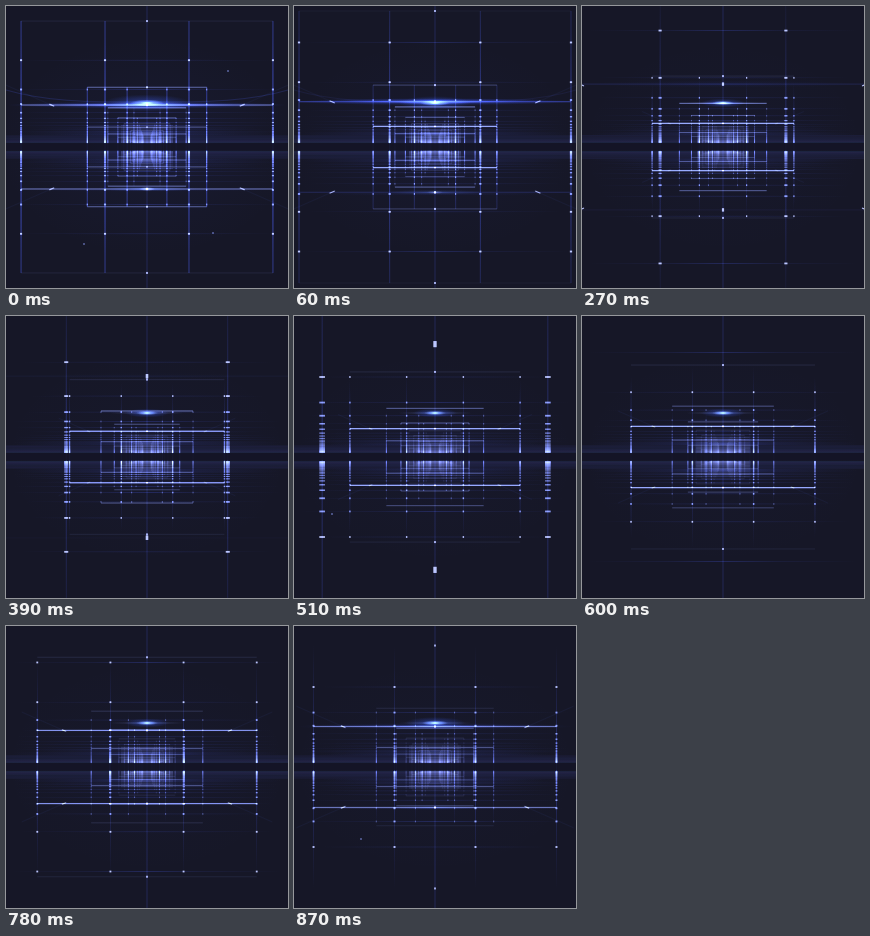
An HTML page with a canvas that plays this animation: 282x282 px, repeating every 0.9 s.

```html
<!DOCTYPE html>
<html>
<head>
<meta charset="utf-8">
<style>
html, body { margin: 0; height: 100%; overflow: hidden; background: #161727; }
canvas { display: block; }
</style>
</head>
<body>
<canvas id="stage" width="282" height="282"></canvas>
<script>
const ctx = document.getElementById('stage').getContext('2d');
const LOOP = 900, STEP = 30, HALF = 141;
const FRAME_GAP = .0088, ROW_GAP = FRAME_GAP * 2 / 3, ROW_LOOP = LOOP / 5;
const BLUE = '58,78,225', PALE = '140,158,250', WHITE = '200,210,255';
const SIGNS = [-1, 1];
// Sparks: time, x, y from the centre
const SPARKS = [[0, 81, -76], [0, -63, 97], [0, 66, 86], [150, -87, -84],
  [510, -103, 57], [690, 24, -45], [690, 32, 51], [870, -74, 72]];

function box(x, y, w, h, color, alpha) {
  if (alpha < .01) return;
  ctx.fillStyle = `rgba(${color},${Math.min(alpha, 1)})`;
  ctx.fillRect(x - w / 2, y - h / 2, w, h);
}

function glow(x, y, rx, ry, color, alpha) {
  if (alpha < .01) return;
  const g = ctx.createRadialGradient(0, 0, 0, 0, 0, 1);
  g.addColorStop(0, `rgba(${color},${alpha})`);
  g.addColorStop(.4, `rgba(${color},${alpha * .35})`);
  g.addColorStop(1, `rgba(${color},0)`);
  ctx.save();
  ctx.translate(x, y);
  ctx.scale(rx, ry);
  ctx.fillStyle = g;
  ctx.fillRect(-1, -1, 2, 2);
  ctx.restore();
}

function segment(x1, y1, x2, y2, width, color, alpha) {
  ctx.strokeStyle = `rgba(${color},${alpha})`;
  ctx.lineWidth = width;
  ctx.beginPath();
  ctx.moveTo(x1, y1);
  ctx.lineTo(x2, y2);
  ctx.stroke();
}

// Perspective: a plane's size is the inverse of its distance
function frameSizes(t) {
  const sizes = [];
  for (let k = 0; k < 10; k++) {
    const depth = .00794 + FRAME_GAP * (k - t / LOOP);
    if (depth > .0018) sizes.push({ k, h: 1 / depth });
  }
  return sizes;
}

function rowHeights(t) {
  const rows = [];
  for (let m = -2; m < 40; m++) {
    const depth = .0125 + ROW_GAP * (m - ((t - 150) % ROW_LOOP) / ROW_LOOP);
    if (depth > .0068 && depth < .235) rows.push(1 / depth);
  }
  return rows;
}

function drawRows(rows) {
  for (const y of rows) for (const s of SIGNS) {
    if (y > 12) glow(0, s * y, 135, .9, BLUE, .24);
    else box(0, s * y, 282, y * .03, BLUE, .12);
    if (y < 22) box(0, s * y, 52, y * .04, PALE, .16);
  }
}

function drawFrame(k, h, rows, flash) {
  const third = h / 3, near = k < 3 ? 1 : .6;
  const bar = (h < 61 ? .4 : .95 * Math.exp(-Math.max(0, h - 100) / 45)) * (k < 4 ? near : .3);
  const edge = Math.min(.6, Math.max(h < 110 ? .1 : 0, (60 - h) / 25)) * (k < 4 ? near : .2);
  const dotAlpha = k < 2 ? .8 : k < 4 ? .4 : .14;
  const dotWidth = Math.max(1, h / 60);

  for (const s of SIGNS) {
    const lower = s > 0 && h > 126 ? .4 : 1;
    box(0, s * third, 2 * h, h > 61 ? 1.2 : 1, h < 135 ? PALE : BLUE, bar * lower);
    box(0, s * h, 2 * h, 1, PALE, edge * (s < 0 ? 1 : .75) + flash * (k === 1 ? .4 : .08));

    for (const x of [s * h, s * third]) {
      if (Math.abs(x) > HALF + 4) continue;
      glow(x, 0, 1, h, BLUE, k < 4 ? .5 : .2);
      box(x, 0, 1, 2 * h, BLUE, flash * (k < 2 ? .45 : .1));
      for (const y of rows) {
        if (y > h) continue;
        const size = Math.min(1.8, y * .045);
        for (const v of SIGNS) box(x, v * y, dotWidth, size, y > 60 ? WHITE : PALE, dotAlpha);
      }
    }
    if (k < 2) {
      box(0, s * h, 1.6, 2, WHITE, .8);
      box(0, s * third, dotWidth * .5 + .6, Math.max(1.5, h / 55), WHITE, .8);
    }
  }

  if (h > 62) for (const sx of SIGNS) for (const sy of SIGNS) {
    const x = sx * h * .76, y = sy * third, visible = Math.min(1, (h - 62) / 90);
    segment(x * 1.02, y * 1.02, x * .97, y * .97, 1.3, WHITE, .8 * visible);
    segment(x * .96, y * .96, x * 1.5, y * 1.5, 1, BLUE, .06);
  }
}

function drawFlare(t, h, flash) {
  const away = t > LOOP / 2 ? (t - LOOP) / 30 : t / 85;
  const pulse = Math.exp(-away * away);
  glow(0, -44, 22 + 22 * pulse, 4.5 + 4 * pulse, '45,85,255', .7);
  glow(0, -44, 11 + 6 * pulse, 2.4 + pulse, '170,215,255', .95);
  glow(0, -44, 40, 1.2, PALE, .4);
  glow(0, -h / 3, 140, 3.5, '45,75,255', pulse * .7 + (h > 126 ? .5 * Math.exp(-(h - 126) / 40) : 0));
  glow(0, -h / 3, 90, 2, PALE, pulse * .6);
  glow(0, h / 3, 50, 2.5, '80,120,255', pulse * .5);
  glow(0, h / 3, 8, 2, WHITE, flash * .8);
  if (flash) for (const s of SIGNS) {
    ctx.strokeStyle = `rgba(${BLUE},${flash * .18})`;
    ctx.beginPath();
    ctx.moveTo(s * 141, -57);
    ctx.quadraticCurveTo(s * 90, -42, 0, -46);
    ctx.stroke();
  }
}

function draw(t) {
  const flash = Math.max(0, 1 - t / 110);
  const rows = rowHeights(t), frames = frameSizes(t);
  ctx.setTransform(1, 0, 0, 1, 0, 0);
  ctx.globalCompositeOperation = 'source-over';
  ctx.fillStyle = '#161727';
  ctx.fillRect(0, 0, 282, 282);
  ctx.translate(HALF, HALF);
  ctx.globalCompositeOperation = 'lighter';

  glow(0, 0, 150, 110, BLUE, .03 + .05 * flash);
  box(0, 0, 1, 282, BLUE, .2);
  drawRows(rows);
  for (const { k, h } of frames) drawFrame(k, h, rows, flash);
  const lead = frames.find(f => f.h < 260);
  drawFlare(t, lead.h, flash);
  for (const [time, x, y] of SPARKS) {
    if (t >= time && t < time + 2 * STEP) box(x, y, 2, 1.2, PALE, .6);
  }

  // Dark horizon gap
  ctx.globalCompositeOperation = 'source-over';
  box(0, -.3, 282, 6.8, '20,20,38', .9);
}

function tick() {
  const t = performance.now() % LOOP;
  draw(Math.floor(t / STEP) * STEP);
  requestAnimationFrame(tick);
}
tick();
</script>
</body>
</html>
```
